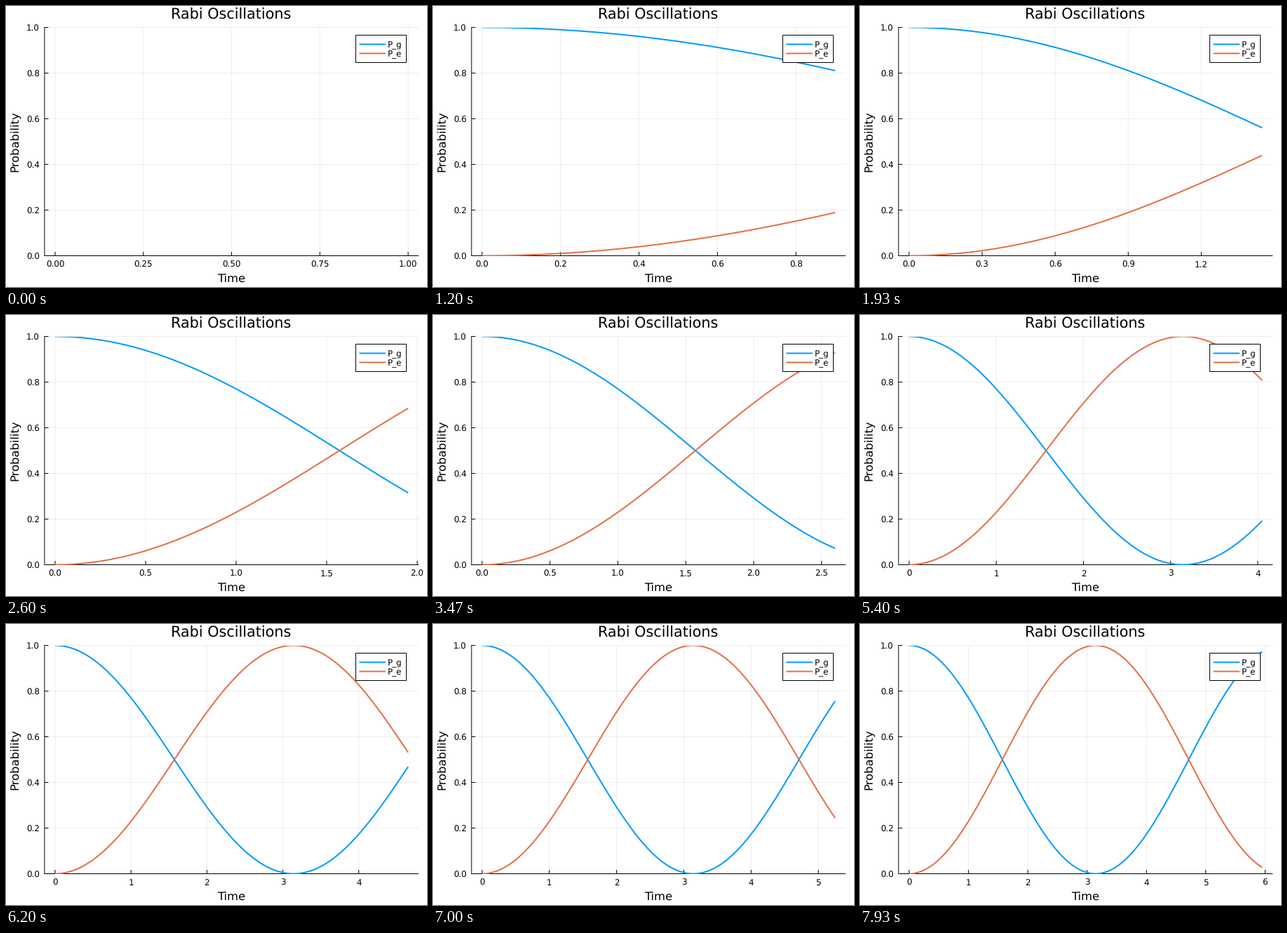
Recreate the animation shown at these times as a matplotlib script. Size 600x400 px, loop 8000 ms.

```python
import math

import numpy as np
import matplotlib.pyplot as plt
from matplotlib.animation import FuncAnimation
from matplotlib.patches import Rectangle

plt.rcParams["font.family"] = "DejaVu Sans"
plt.rcParams["text.hinting"] = "none"

W, H, DPI = 600, 400, 100
LOOP_MS, TICK_MS = 8000, 20
STEPS_PER_MS = 15 / 1000            # the plot grows 15 times a second
DT = 0.05
LEFT, RIGHT, TOP, BOTTOM = 54.9, 588.2, 30.5, 355.5
TICK = 5.5
MARGIN = 0.03
BLUE, ORANGE = "#009AFA", "#E36F47"
PX = 72 / DPI                       # one pixel in points
TITLE, GUIDE, SMALL = 20.8, 16.35, 11.9
LEGEND_X = {"left": 72.5, "right": 498.5}
# tick steps with how "nice" each of them is
STEPS = [(5, 0.9), (3, 0.2), (2.5, 0.5), (2, 0.7), (1, 1.0)]

fig = plt.figure(figsize=(W / DPI, H / DPI), dpi=DPI, facecolor="white")
ax = fig.add_axes([0, 0, 1, 1])
ax.set_xlim(0, W)
ax.set_ylim(H, 0)
ax.axis("off")


def line(xs, ys, color="black", width=1.0, **kw):
    return ax.plot(xs, ys, color=color, lw=width * PX, snap=False,
                   solid_capstyle="butt", **kw)[0]


def label(x, y, s, size, **kw):
    kw = {"ha": "center", "va": "baseline", **kw}
    return ax.text(x, y, s, fontsize=size * PX, color="black", **kw)


def y_pos(p):
    return BOTTOM - p * (BOTTOM - TOP)


def strokes(positions, a, b):
    """Separate strokes from a to b, one at each position."""
    along = np.repeat(positions, 3).astype(float)
    across = np.tile([a, b, np.nan], len(positions))
    return along, across


def best_step(span, hi):
    """Pick the tick step by granularity, coverage and niceness."""
    best, best_score = None, -math.inf
    for z in (1, 0, -1, -2, -3):
        for q, nice in STEPS:
            step = q * 10.0 ** z
            n = math.floor(hi / step + 1e-9) + 1
            if not 4 <= n <= 8:
                continue
            grain = 1 - abs(n - 5) / 5
            cover = 1.5 * span / ((n - 1) * step)
            score = grain / 4 + cover / 3 + nice / 4
            if score > best_score + 1e-9:
                best, best_score = (step, n), score
    return best


def decimals(step):
    d = 0
    while abs(step * 10 ** d - round(step * 10 ** d)) > 1e-6:
        d += 1
    return d


def crowding(u, p, corner):
    """How closely the points of a curve gather around an upper corner."""
    near = (np.abs(u - corner) <= 0.25) & (p >= 0.75)
    dist = np.hypot(u[near] - corner, p[near] - 1)
    return np.sum(1 / (1 + 100 * dist))


# fixed parts
probs = np.arange(6) / 5
rows = y_pos(probs)
line(*strokes(rows, LEFT, RIGHT)[::-1], alpha=0.07, zorder=1)
line(*strokes(rows, LEFT, LEFT + TICK)[::-1], zorder=2)
line([LEFT, RIGHT], [BOTTOM, BOTTOM], zorder=2)
line([LEFT, LEFT], [TOP - 0.5, BOTTOM + 0.5], zorder=2)
for p, y in zip(probs, rows):
    label(47.7, y + 5.1, f"{p:.1f}", SMALL, ha="right")
label(320.9, 19, "Rabi Oscillations", TITLE)
label(321.4, 393, "Time", GUIDE)
label(17, 193, "Probability", GUIDE, rotation=90, rotation_mode="anchor")

# moving parts
grid = line([], [], alpha=0.07, zorder=1)
ticks = line([], [], zorder=2)
tick_labels = [label(0, 372, "", SMALL) for _ in range(8)]
area = Rectangle((LEFT, TOP), RIGHT - LEFT, BOTTOM - TOP,
                 transform=ax.transData)
curves = [line([], [], c, 2, zorder=3) for c in (BLUE, ORANGE)]
for c in curves:
    c.set_clip_path(area)

box = ax.add_patch(Rectangle((0, 41.5), 72, 39, facecolor="white", snap=False,
                             edgecolor="black", lw=PX, zorder=4))
keys = [line([], [], c, 2, zorder=5) for c in (BLUE, ORANGE)]
names = [label(0, y, s, SMALL, ha="left", zorder=5)
         for y, s in ((59.3, "P_g"), (72.3, "P_e"))]


def place_legend(x):
    box.set_x(x)
    for i, (key, name) in enumerate(zip(keys, names)):
        y = 54.5 + 13 * i
        key.set_data([x + 5, x + 42.5], [y, y])
        name.set_x(x + 45.3)


def draw(tick):
    # steps fall on whole hundredths of a second
    now = (tick + 0.5) * TICK_MS
    count = int((now + 5) * STEPS_PER_MS)

    t = np.arange(count + 1) * DT
    end = t[-1] if count else 1.0
    lo, hi = -MARGIN * end, (1 + MARGIN) * end
    span = hi - lo
    u = (t - lo) / span
    ground = np.cos(t / 2) ** 2
    excited = 1 - ground

    for curve, p in zip(curves, (ground, excited)):
        curve.set_data(LEFT + u * (RIGHT - LEFT), y_pos(p))

    step, n = best_step(span, hi)
    values = step * np.arange(n)
    xs = LEFT + (values - lo) / span * (RIGHT - LEFT)
    grid.set_data(*strokes(xs, TOP, BOTTOM))
    ticks.set_data(*strokes(xs, BOTTOM, BOTTOM - TICK))
    d = decimals(step)
    for k, text in enumerate(tick_labels):
        text.set_text(f"{values[k]:.{d}f}" if k < n else "")
        if k < n:
            text.set_x(xs[k])

    left, right = (sum(crowding(u, p, c) for p in (ground, excited))
                   for c in (0, 1))
    place_legend(LEGEND_X["left" if left < right else "right"])
    return [grid, ticks, box, *curves, *keys, *names, *tick_labels]


anim = FuncAnimation(fig, draw, frames=LOOP_MS // TICK_MS, interval=TICK_MS,
                     init_func=lambda: draw(0), repeat=True, repeat_delay=0)
plt.show()
```
